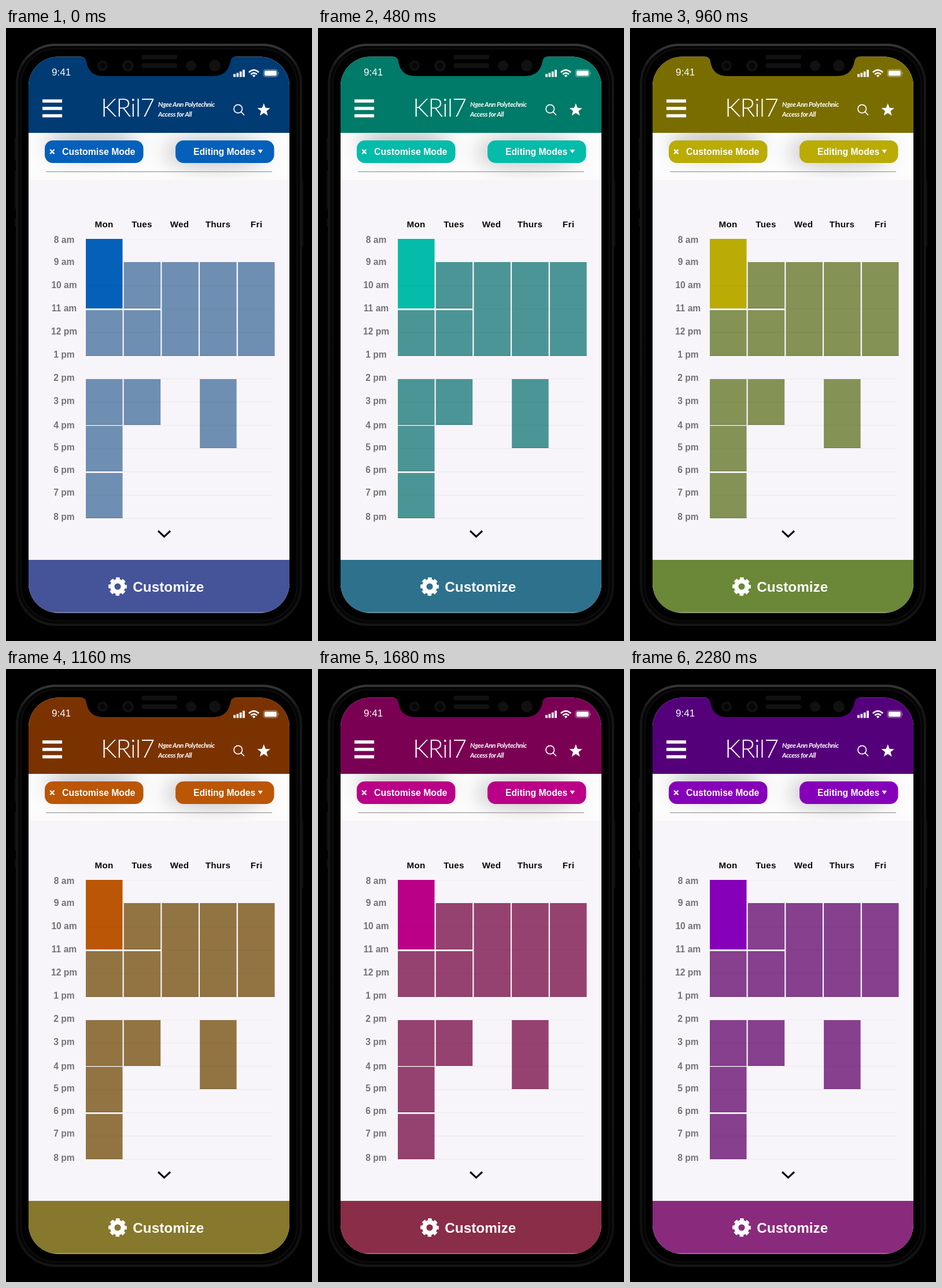
These frames come from a looping animation (529x1058 px, 2320 ms). An HTML page:

```html
<!DOCTYPE html>
<html lang="en">
<head>
<meta charset="utf-8">
<title>Timetable theme colours</title>
<style>
  html, body { margin: 0; width: 100%; height: 100%; overflow: hidden; background: #000; }
  svg { display: block; width: 100%; height: 100%; }
  text { font-family: "Liberation Sans", Arial, sans-serif; font-weight: 700; }
  .white { fill: #fff; }
  .line { fill: none; stroke: #fff; }
  .tag { font: italic 700 11.5px Lato, sans-serif; letter-spacing: -.4px; fill: #fff; }
  .header { fill: var(--header); }
  .accent { fill: var(--accent); }
  .block { fill: var(--block); }
  .footer { fill: var(--footer); }
</style>
</head>
<body>
<svg viewBox="0 0 529 1058">
  <defs>
    <linearGradient id="rim" x2="0" y2="1">
      <stop offset="0" stop-color="#353535"/>
      <stop offset=".04" stop-color="#161616"/>
      <stop offset=".95" stop-color="#101010"/>
      <stop offset="1" stop-color="#151515"/>
    </linearGradient>
    <filter id="soft" x="-50%" y="-80%" width="200%" height="260%">
      <feGaussianBlur stdDeviation="17"/>
    </filter>
    <clipPath id="screen"><rect x="39" y="49.5" width="451" height="960" rx="51"/></clipPath>
    <clipPath id="bar"><rect x="39" y="181" width="451" height="81"/></clipPath>
  </defs>

  <rect width="529" height="1058"/>
  <path d="M16.5 188V228M16.5 246V312M16.5 328V342M512.5 262V378" stroke="#0e0e0e" stroke-width="3"/>
  <rect x="19" y="29" width="491" height="1001" rx="67" fill="#050505" stroke="url(#rim)" stroke-width="4"/>
  <rect x="26" y="36" width="477" height="987" rx="61" fill="#000" stroke="#111" stroke-width="1.5"/>

  <g clip-path="url(#screen)">
    <rect x="39" y="49" width="451" height="961" fill="#f7f5f9"/>
    <rect class="header" x="39" y="49" width="451" height="132"/>
    <g clip-path="url(#bar)">
      <rect x="39" y="181" width="451" height="81" fill="#fcfcfd"/>
      <g filter="url(#soft)" opacity=".2">
        <ellipse cx="148" cy="200" rx="80" ry="26"/>
        <ellipse cx="362" cy="214" rx="88" ry="28"/>
      </g>
    </g>
    <rect class="footer" x="39" y="918" width="451" height="92"/>
    <path d="M82 1008.5H447" stroke="#fff" stroke-opacity=".35"/>
  </g>

  <path d="M128 49Q138 49 139 58Q143 83 168 83H358Q383 83 388 58Q389 49 399 49V46H128Z"/>
  <g fill="#111">
    <rect x="234" y="46" width="62" height="8" rx="4"/>
    <rect x="234" y="61" width="62" height="8" rx="4"/>
    <circle cx="167" cy="65" r="9"/><circle cx="211" cy="65" r="10"/>
    <circle cx="320" cy="65" r="9"/><circle cx="361" cy="65" r="10"/>
  </g>
  <circle cx="167" cy="65" r="5" fill="#060606"/>
  <circle cx="211" cy="65" r="5.5" fill="#060606"/>

  <text class="white" x="79" y="82" style="font-size:17px;font-weight:400">9:41</text>
  <path class="line" stroke-width="3.8" d="M395 84.5V79.5M400.3 84.5V77.5M405.7 84.5V75M411 84.5V72"/>
  <path class="line" stroke-width="2.5" d="M419.8 76.5Q428.5 68.5 437.2 76.5M423.2 80Q428.5 75.2 433.8 80"/>
  <path class="white" d="M425.7 82Q428.5 79.6 431.3 82L428.5 85Z"/>
  <rect class="line" x="445" y="71.8" width="24.5" height="12.4" rx="3.6" stroke-opacity=".5"/>
  <rect class="white" x="446.8" y="73.6" width="21" height="8.8" rx="2"/>
  <path class="white" d="M470.6 76Q472.6 78 470.6 80Z" opacity=".6"/>

  <path class="line" stroke-width="5.6" d="M63 126H97M63 138.7H97M63 151.5H97"/>
  <text class="white" x="164" y="153" style="font:300 43px Lato,sans-serif;letter-spacing:-1px">KRil7</text>
  <text class="tag" x="263" y="135.5">Ngee Ann Polytechnic</text>
  <text class="tag" x="263" y="153">Access for All</text>
  <g class="line" stroke-width="1.7" stroke-linecap="round">
    <circle cx="401.2" cy="139.5" r="7.2"/>
    <path d="M406.5 144.8L411.5 150"/>
  </g>
  <path id="star" class="white"/>

  <rect class="accent" x="67" y="194" width="170.5" height="39" rx="14"/>
  <rect class="accent" x="293" y="194" width="170.5" height="39" rx="14"/>
  <path class="line" stroke-width="2.3" d="M76.2 209.7L83.4 217.3M83.4 209.7L76.2 217.3"/>
  <text class="white" x="97" y="218.7" font-size="15.8">Customise Mode</text>
  <text class="white" x="324" y="218.7" font-size="15.7">Editing Modes</text>
  <path class="white" d="M435.5 210H444L439.7 216.2Z"/>
  <path d="M69 248H460" stroke="#a9a8ab" stroke-width="1.4"/>

  <g id="table"></g>
  <path d="M263 868L273.5 877.8L284 868" fill="none" stroke="#080808" stroke-width="3.2"/>

  <g class="line">
    <circle cx="193" cy="964" r="9.3" stroke-width="7.4"/>
    <circle cx="193" cy="964" r="13.6" stroke-width="4.6" stroke-dasharray="6.4 4.28" stroke-dashoffset="3.2"/>
  </g>
  <text class="white" x="219.3" y="973" font-size="24.3">Customize</text>
</svg>

<script>
const LOOP = 2320, STEP = 40;
const root = document.documentElement;
const table = document.getElementById("table");

function add(tag, attrs, text = "") {
  const el = document.createElementNS("http://www.w3.org/2000/svg", tag);
  for (const key in attrs) el.setAttribute(key, attrs[key]);
  el.textContent = text;
  table.append(el);
}

// Timetable: column left edges, then [column, top, bottom] per lesson
const columns = [138, 203.7, 269.4, 335.1, 401];
const lessons = [
  [0, 364, 484], [0, 487, 566], [0, 606, 685], [0, 686.5, 765], [0, 768, 846],
  [1, 404, 484], [1, 487, 566], [1, 606, 685],
  [2, 404, 566], [3, 404, 566], [3, 606, 725], [4, 404, 566]
];
lessons.forEach(([col, top, bottom], i) => {
  add("rect", { class: i ? "block" : "accent", x: columns[col], y: top, width: 63.5, height: bottom - top });
  if (i) add("rect", { x: columns[col], y: bottom - 1, width: 63.5, height: 1, opacity: .2 });
});
for (let hour = 0; hour <= 12; hour++) {
  if (hour === 1 || hour === 5) continue;
  add("rect", { x: 138, y: 364.5 + 40.1 * hour, width: 322, height: 1, opacity: hour ? .06 : .03 });
}

["Mon", "Tues", "Wed", "Thurs", "Fri"].forEach((day, i) =>
  add("text", { x: [169.5, 235, 300, 366.5, 433][i], y: 344.3, "font-size": 15.2,
    "letter-spacing": .3, "text-anchor": "middle", fill: "#080808" }, day));

[371, 408.5, 448.5, 488.5, 528.5, 568.5, 608.5, 648.5, 690.5, 729, 767.5, 806.5, 848.5].forEach((y, i) => {
  const hour = i + 8;
  add("text", { x: 100.5, y, "font-size": 15.6, "text-anchor": "middle", fill: "#747276" },
    `${hour > 12 ? hour - 12 : hour} ${hour < 12 ? "am" : "pm"}`);
});

const star = Array.from({ length: 10 }, (_, i) => {
  const r = i % 2 ? 5 : 11.8, a = Math.PI * (i / 5 - .5);
  return `${445.7 + r * Math.cos(a)} ${141.8 + r * Math.sin(a)}`;
});
document.getElementById("star").setAttribute("d", `M${star.join("L")}Z`);

// Theme colours at key times; hue always runs downwards between them
const times = [0, 480, 960, 1160, 1480, 1680, 2280];
const themes = {
  header: "#003b74 #007a69 #7a6d00 #7a3300 #7a0000 #7a0054 #54007a",
  accent: "#0560ba #05bbaa #baac05 #ba5605 #ba050a #ba0086 #8600ba",
  block: "#6e8fb2 #4c9596 #849256 #927442 #964c42 #964270 #86408e",
  footer: "#455498 #2e718c #6a8838 #86782c #8a4d2a #8a2d48 #8a2a7c"
};

function toHsl(hex) {
  const [r, g, b] = [1, 3, 5].map(i => parseInt(hex.slice(i, i + 2), 16) / 255);
  const max = Math.max(r, g, b), min = Math.min(r, g, b), d = max - min;
  const hue = max === r ? (g - b) / d : max === g ? 2 + (b - r) / d : 4 + (r - g) / d;
  return [(hue * 60 + 360) % 360, d / (1 - Math.abs(max + min - 1)), (max + min) / 2];
}
for (const name in themes) themes[name] = themes[name].split(" ").map(toHsl);

function draw(ms) {
  const t = Math.floor((ms % LOOP) / STEP) * STEP;
  let i = 0;
  while (i < times.length - 2 && t >= times[i + 1]) i++;
  const p = (t - times[i]) / (times[i + 1] - times[i]);
  for (const name in themes) {
    const [h0, s0, l0] = themes[name][i], [h1, s1, l1] = themes[name][i + 1];
    const hue = h0 - p * ((h0 - h1 + 360) % 360);
    const sat = 100 * (s0 + p * (s1 - s0)), light = 100 * (l0 + p * (l1 - l0));
    root.style.setProperty("--" + name, `hsl(${(hue + 360) % 360}, ${sat}%, ${light}%)`);
  }
}

const start = performance.now();
function tick() {
  draw(performance.now() - start);
  requestAnimationFrame(tick);
}
tick();
</script>
</body>
</html>
```
